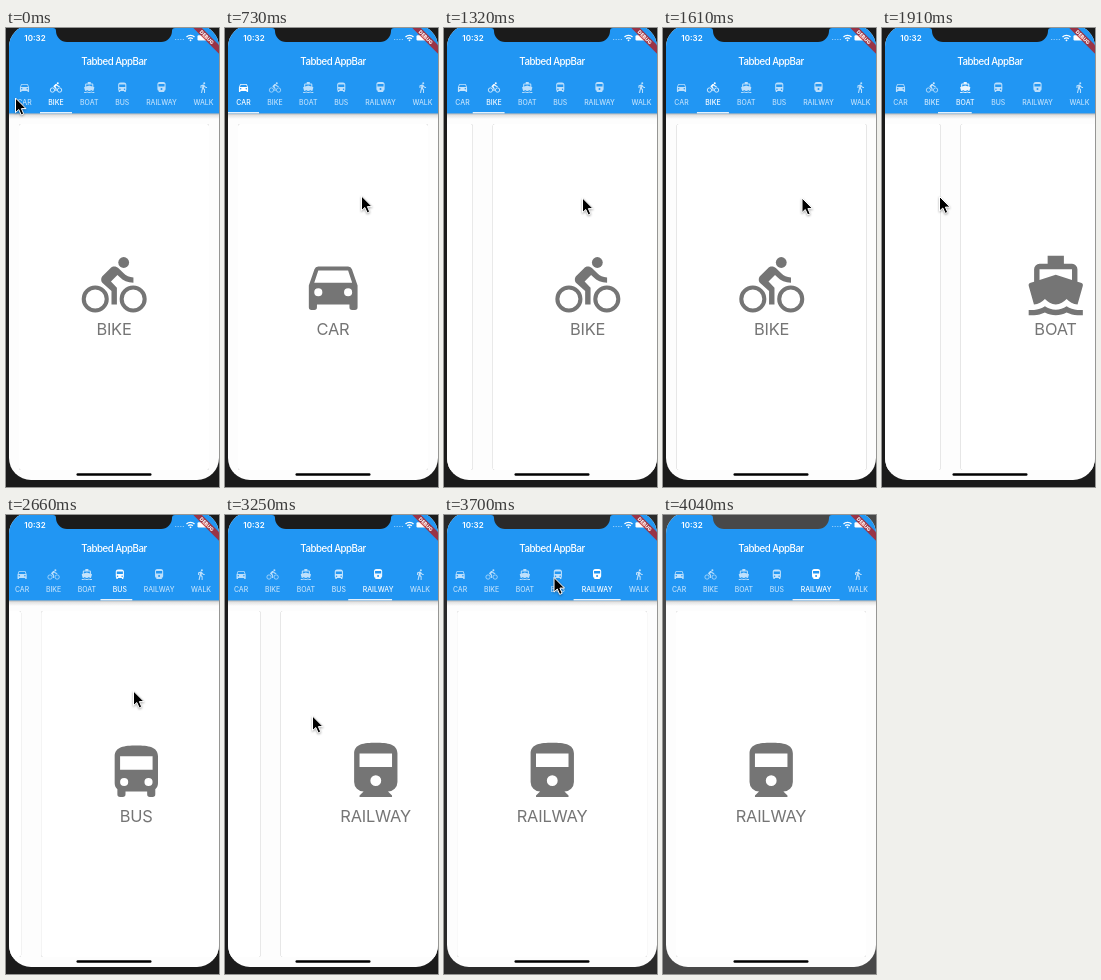
These frames come from a looping animation (213 px wide and 459 px high, 4.14 s). An HTML page:

```html
<!DOCTYPE html>
<html lang="en">
<head>
<meta charset="utf-8">
<title>Tabbed AppBar</title>
<style>
  html, body { margin: 0; width: 100%; height: 100%; overflow: hidden; background: #1b1b1c; }
  svg { display: block; width: 100vw; height: 100vh; }
  text { font-family: Inter, Roboto, sans-serif; fill: currentColor; text-anchor: middle; }
  symbol { fill: currentColor; fill-rule: evenodd; overflow: visible; }
  .title { font-size: 9.7px; font-weight: 500; letter-spacing: -.5px; }
  .label { font-size: 6.9px; font-weight: 500; }
  .clock { font-size: 8px; font-weight: 600; }
  .big { font-size: 16.4px; letter-spacing: -.2px; }
  .debug { font-size: 5px; font-weight: 800; }
  .card { fill: #fff; filter: drop-shadow(0 .6px .5px rgba(0, 0, 0, .38)); }
  #bar { color: #fff; }
  #pages { color: #757575; }
  #cursor { filter: drop-shadow(0 1px 1px rgba(0, 0, 0, .35)); }
</style>
</head>
<body>
<svg viewBox="0 0 213 459" preserveAspectRatio="none">
  <defs>
    <clipPath id="screen"><rect x="3" y="-3" width="210" height="455" rx="22"/></clipPath>
    <linearGradient id="shade" x2="0" y2="1">
      <stop stop-color="#000" stop-opacity=".32"/>
      <stop offset=".4" stop-color="#000" stop-opacity=".1"/>
      <stop offset="1" stop-color="#000" stop-opacity="0"/>
    </linearGradient>
    <symbol id="CAR" viewBox="0 0 24 24">
      <path d="M18.92 6A1.5 1.5 0 0 0 17.5 5h-11A1.5 1.5 0 0 0 5.08 6L3 12v8a1 1 0 0 0 1 1h1a1 1 0 0 0 1-1v-1h12v1a1 1 0 0 0 1 1h1a1 1 0 0 0 1-1v-8zM5 11l1.5-4.5h11L19 11zM5 14.5a1.5 1.5 0 0 0 3 0a1.5 1.5 0 0 0-3 0M16 14.5a1.5 1.5 0 0 0 3 0a1.5 1.5 0 0 0-3 0"/>
    </symbol>
    <symbol id="BIKE" viewBox="0 0 24 24">
      <circle cx="15.5" cy="3.5" r="2"/>
      <g fill="none" stroke="currentColor" stroke-width="1.5">
        <circle cx="5" cy="17" r="4.25"/><circle cx="19" cy="17" r="4.25"/>
      </g>
      <path d="M10.8 10.5l2.4-2.4.8.8c1.3 1.3 3 2.1 5.1 2.1V9c-1.5 0-2.7-.6-3.6-1.5l-1.9-1.9c-.5-.4-1-.6-1.6-.6s-1.1.2-1.4.6L7.8 8.4c-.4.4-.6.9-.6 1.4 0 .6.2 1.1.6 1.4L11 14v5h2v-6.2z"/>
    </symbol>
    <symbol id="BOAT" viewBox="0 0 24 24">
      <path d="M20 21c-1.4 0-2.8-.5-4-1.3-2.4 1.7-5.6 1.7-8 0C6.8 20.5 5.4 21 4 21H2v2h2c1.4 0 2.7-.4 4-1 2.5 1.3 5.5 1.3 8 0 1.3.6 2.6 1 4 1h2v-2z"/>
      <path d="M3.95 19c1.6 0 3.05-.9 4.05-2 1 1.1 2.4 2 4 2s3-.9 4-2c1 1.1 2.4 2 4.05 2l1.9-6.7a1 1 0 0 0-.67-1.27L20 10.6V6a2 2 0 0 0-2-2h-3V1H9v3H6a2 2 0 0 0-2 2v4.6l-1.28.43a1 1 0 0 0-.67 1.27zM6 6h12v4l-6-2-6 2z"/>
    </symbol>
    <symbol id="BUS" viewBox="0 0 24 24">
      <path d="M4 16c0 .9.4 1.7 1 2.2V20a1 1 0 0 0 1 1h1a1 1 0 0 0 1-1v-1h8v1a1 1 0 0 0 1 1h1a1 1 0 0 0 1-1v-1.8c.6-.5 1-1.3 1-2.2V6c0-3.5-3.6-4-8-4s-8 .5-8 4zM6 6h12v5H6zM6 15.5a1.5 1.5 0 0 0 3 0a1.5 1.5 0 0 0-3 0M15 15.5a1.5 1.5 0 0 0 3 0a1.5 1.5 0 0 0-3 0"/>
    </symbol>
    <symbol id="RAILWAY" viewBox="0 0 24 24">
      <path d="M4 15.5A3.5 3.5 0 0 0 7.5 19L6 20.5v.5h12v-.5L16.5 19a3.5 3.5 0 0 0 3.5-3.5V5c0-3.5-3.6-4-8-4s-8 .5-8 4zM6 5h12v5H6zM10 15a2 2 0 0 0 4 0a2 2 0 0 0-4 0"/>
    </symbol>
    <symbol id="WALK" viewBox="0 0 24 24">
      <circle cx="13.5" cy="3.5" r="2"/>
      <path d="M9.8 8.9L7 23h2.1l1.8-8 2.1 2v6h2v-7.5l-2.1-2 .6-3C14.8 12 16.8 13 19 13v-2c-1.9 0-3.5-1-4.3-2.4l-1-1.6c-.4-.6-1-1-1.7-1-.3 0-.5.1-.8.1L6 8.3V13h2V9.6z"/>
    </symbol>
  </defs>

  <rect id="bezel" width="213" height="459"/>
  <g clip-path="url(#screen)">
    <rect width="213" height="459" fill="#fdfdfd"/>
    <g id="pages"></g>
    <rect y="85" width="213" height="6" fill="url(#shade)"/>
    <g id="bar">
      <rect y="-3" width="213" height="88.4" fill="#2196f3"/>
      <text class="title" x="108" y="37">Tabbed AppBar</text>
      <g id="tabs"></g>
      <text class="clock" x="29" y="13">10:32</text>
      <path d="M169 11.5h9" stroke="#fff" stroke-opacity=".5" stroke-width="1.2" stroke-dasharray="1.2 1.4"/>
      <g fill="none" stroke="#fff" stroke-width="1.3">
        <path d="M180.5 9a5.6 5.6 0 0 1 8 0M182.2 10.9a3.2 3.2 0 0 1 4.6 0"/>
      </g>
      <circle cx="184.5" cy="12.3" r=".9" fill="#fff"/>
      <rect x="191.5" y="7.2" width="10.5" height="5.2" rx="1.2" fill="#fff"/>
      <g transform="translate(213 -3) rotate(45)">
        <rect x="-30" y="14.2" width="60" height="6.1" fill="#b71c1c" fill-opacity=".8"/>
        <text class="debug" y="19.1">DEBUG</text>
      </g>
    </g>
    <rect x="70.5" y="445.3" width="75" height="2.4" rx="1.2"/>
  </g>
  <path id="notch" d="M47 0q3 0 3 3a11 11 0 0 0 11 11h94a11 11 0 0 0 11-11q0-3 3-3z"/>
  <path id="cursor" d="M0 0v14.6l3.3-3.1 2.4 5.4 2.5-1.1-2.3-5.2h4.6z" stroke="#fff" stroke-width="1" stroke-linejoin="round"/>
</svg>

<script>
const LOOP = 4140, STEP = 148, PAGE = 210;
const names = ['CAR', 'BIKE', 'BOAT', 'BUS', 'RAILWAY', 'WALK'];
const edges = [3, 34, 66, 100.5, 132, 179, 216];
const swipes = [6.47, 10.95, 15.15, 19.6];
// step, x, y of the pointer tip
const pointer = [
  [1.5, 9.5, 70], [5, 136.5, 168], [6.4, 137, 168], [7.8, 62, 167], [9, 138.5, 170],
  [11, 139, 170], [13, 57.5, 168.5], [15.1, 136, 176], [16.7, 62, 176], [18, 127.5, 176],
  [19.6, 140, 198], [21.2, 66, 200], [22, 87.5, 201], [24, 110, 150], [26, 110, -25]
];

const $ = id => document.getElementById(id);
const clamp = v => Math.max(0, Math.min(1, v));
const mix = (a, b, u) => a + (b - a) * u;
const smooth = v => (v = clamp(v), v * v * (3 - 2 * v));
const move = (el, x, y = 0) => el.setAttribute('transform', `translate(${x} ${y})`);
const icon = (name, x, y, size) =>
  `<use href="#${name}" x="${x - size / 2}" y="${y - size / 2}" width="${size}" height="${size}"/>`;

$('pages').innerHTML = names.map((name, i) => `<g transform="translate(${i * PAGE})">
  <rect class="card" x="13" y="96" width="190" height="346" rx="2"/>
  ${icon(name, 108.2, 257.5, 65)}<text class="big" x="108" y="307">${name}</text></g>`).join('');

$('tabs').innerHTML = names.map((name, i) => {
  const x = (edges[i] + edges[i + 1]) / 2;
  return `<g>${icon(name, x, 59.5, 12.2)}<text class="label" x="${x}" y="77">${name}</text></g>`;
}).join('') + '<rect id="line" y="84" width="30" height="1.4" fill="#e4f1fc"/>';

// A tap goes back to the first page, then each swipe flings one page on.
function pageAt(k) {
  return swipes.reduce((page, start) => page + 1 - Math.exp(-((Math.max(0, k - start) / 1.9) ** 2)),
    1 - smooth((k - 1.5) / 2));
}

function pointerAt(k) {
  const n = pointer.findIndex(key => key[0] > k);
  if (n < 0) return pointer.at(-1).slice(1);
  if (n === 0) return pointer[0].slice(1);
  const a = pointer[n - 1], b = pointer[n], u = smooth((k - a[0]) / (b[0] - a[0]));
  return [mix(a[1], b[1], u), mix(a[2], b[2], u)];
}

function draw(now) {
  const k = Math.floor((now % LOOP + 20) / STEP);
  const page = pageAt(k);
  move($('pages'), -page * PAGE);
  move($('tabs'), -2.4 * clamp((page - 2) / .4));

  const i = Math.min(4, Math.floor(page)), u = page - i;
  const left = mix(edges[i], edges[i + 1], u), right = mix(edges[i + 1], edges[i + 2], u);
  $('line').setAttribute('x', left);
  $('line').setAttribute('width', right - left);
  names.forEach((_, n) => {
    $('tabs').children[n].setAttribute('opacity', .7 + .3 * clamp(1 - Math.abs(page - n)));
  });

  move($('cursor'), ...pointerAt(k));
  const grey = mix(27, 72, clamp((k - 24) / 3));
  for (const id of ['bezel', 'notch']) $(id).setAttribute('fill', `rgb(${grey},${grey},${grey})`);
  requestAnimationFrame(tick);
}

const start = performance.now();
function tick() { draw(performance.now() - start); }
tick();
</script>
</body>
</html>
```
